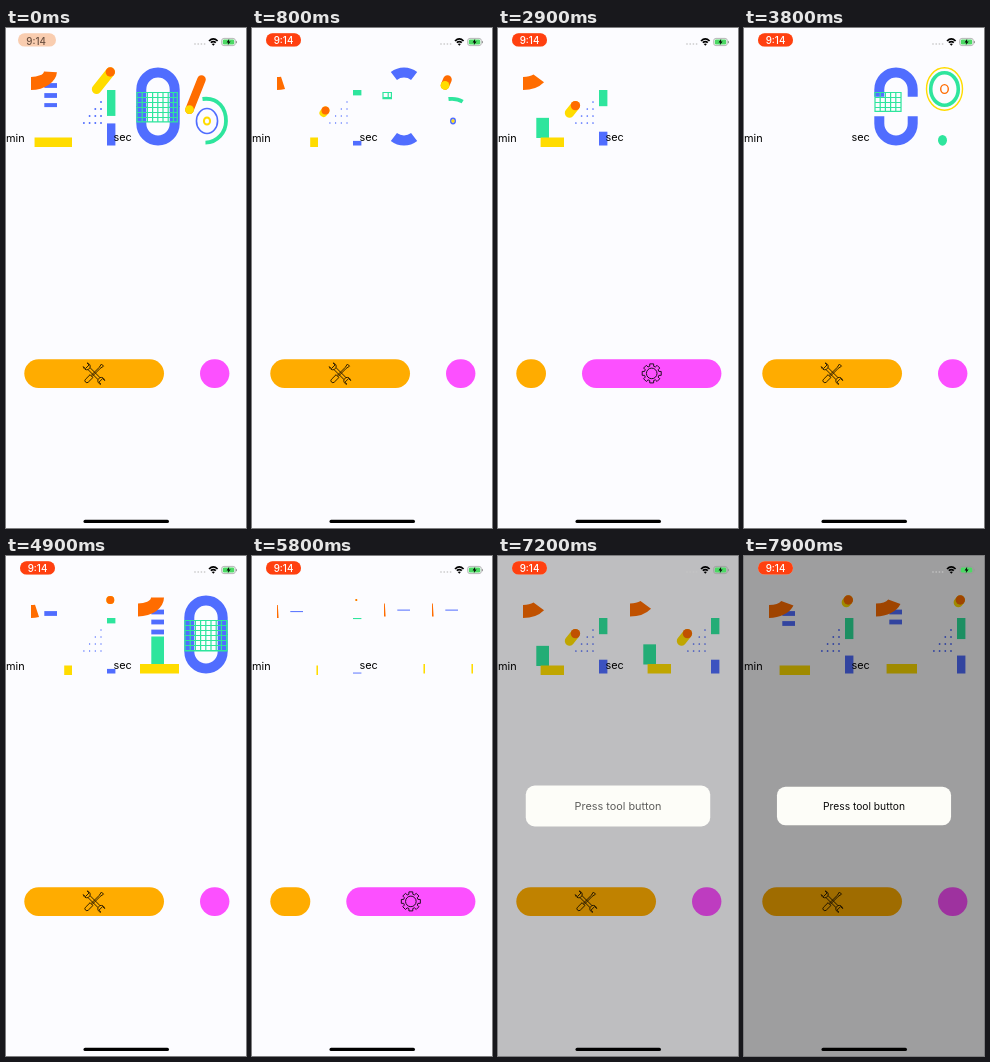
An HTML page for the animation above (8000 ms loop, 240 px wide and 500 px high).

```html
<!DOCTYPE html>
<html lang="en">
<head>
<meta charset="utf-8">
<style>
  html, body { margin: 0; width: 100%; height: 100%; overflow: hidden; background: #fcfcff; }
  svg { display: block; width: 240px; height: 500px; font-family: Inter, "Liberation Sans", sans-serif; }
</style>
</head>
<body>
<svg id="stage" viewBox="0 0 240 500"></svg>
<script>
const LOOP = 8000, STEP = 100, FADE = 500;
const BLUE = '#506dff', GREEN = '#2ee59d', YELLOW = '#ffdc00', ORANGE = '#ff6c00';
const stage = document.getElementById('stage');

const clamp = v => Math.max(0, Math.min(1, v));
const mix = (a, b, k) => a + (b - a) * k;
const ramp = (t, start, length) => {
  const k = clamp((t - start) / length);
  return k * k * (3 - 2 * k);
};

const rect = (x, y, w, h, fill, r = 0) =>
  w > 0 && h > 0 ? `<rect x="${x}" y="${y}" width="${w}" height="${h}" rx="${r}" fill="${fill}"/>` : '';
const oval = (x, y, rx, ry, fill) => `<ellipse cx="${x}" cy="${y}" rx="${rx}" ry="${ry}" fill="${fill}"/>`;
const ring = (x, y, rx, ry, color, width) =>
  `<ellipse cx="${x}" cy="${y}" rx="${rx}" ry="${ry}" fill="none" stroke="${color}" stroke-width="${width}"/>`;
const path = (d, color, width, extra = '') =>
  `<path d="${d}" fill="none" stroke="${color}" stroke-width="${width}" ${extra}/>`;
const trimmed = (d, color, width, k) =>
  k > 0 ? path(d, color, width, `pathLength="1" stroke-dasharray="${k} 2"`) : '';
const text = (x, y, size, fill, label, extra = '') =>
  `<text x="${x}" y="${y}" font-size="${size}" fill="${fill}" ${extra}>${label}</text>`;
const group = (transform, content, opacity = 1) =>
  `<g transform="${transform}" opacity="${opacity}">${content}</g>`;

// Each digit is drawn in a 43 px wide slot; p is presence, rise and fall count from its start and to its end.
const eightTop = p => group(`translate(21.5 61) scale(${clamp(p * 3)})`,
  ring(0, 0, 18, 21.3, YELLOW, 1.4) + ring(0, 0, 13.8, 16.3, GREEN, 3.6) + ring(0, 0, 3.8, 4.4, ORANGE, 1.4));

// A bent band between two quarter ellipses, opening from its lower end.
function flag(p) {
  const a = p * Math.PI / 2, sin = Math.sin(a), cos = Math.cos(a);
  return `<path fill="${ORANGE}" d="M1 47.5A13 6 0 0 0 ${1 + 13 * sin} ${41.5 + 6 * cos}`
    + `L${1 + 26 * sin} ${41.5 + 19 * cos}A26 19 0 0 1 1 60.5Z"/>`;
}

const digits = {
  0({ p }) {
    const w = 42 * p, h = 30.5 * p, reach = clamp(p * 1.24);
    let out = '';
    for (const side of [0, 1]) {
      const x = side ? 37.7 : 4.3;
      out += trimmed(`M21 44.5A16.7 17 0 0 ${side} ${x} 61.5V79`, BLUE, 10, reach);
      out += trimmed(`M21 112.5A16.7 17 0 0 ${1 - side} ${x} 95.5V78`, BLUE, 10, reach);
    }
    let lines = `M0 64.5h${w}v${h}h${-w}z`;
    for (let x = 5.2; x < w; x += 5.2) lines += `M${x} 64.5v${h}`;
    for (let y = 5; y < h; y += 5) lines += `M0 ${64.5 + y}h${w}`;
    return out + path(lines, GREEN, 1.2);
  },
  1({ p, rise, fall }) {
    const leaving = fall < 1;
    const shown = leaving ? 25 * clamp((p - 0.7) / 0.3) : 25 * p;
    const base = leaving ? 28 * clamp((p - 0.2) * 1.8) : 28 * clamp((rise - 1) / 0.3);
    let out = '';
    for (const y of [0, 10, 20]) {
      out += rect(14.3, 53.6 + y, 12.7, Math.min(4.8, shown - y), BLUE);
    }
    return out + rect(14.3, 108.5 - base, 12.7, base, GREEN)
      + rect(42 - 39 * p, 108, 39 * p, 9.5, YELLOW) + flag(p);
  },
  4({ p, rise, fall }) {
    const head = clamp((rise - 0.75) / 0.5);
    const from = fall < 1 ? 1 - Math.max(0.3 * p, 1 - (1 - p) * 3.1) : 0;
    const point = k => [mix(37.3, 4.5, k), mix(44, 85, k)];
    const r = 4.7 * clamp(p * 4 + 0.05), [x, y] = point(from), [endX, endY] = point(Math.max(head, from));
    let out = path(`M${x} ${y}L${endX} ${endY}`, YELLOW, 2 * r, 'stroke-linecap="round"')
      + oval(x, y, r, r, ORANGE);
    const dot = 0.6 + 0.4 * p;
    if (p > 0.1) for (let row = 0; row < 4; row++) {
      for (let col = 0; col <= row; col++) {
        out += oval(28 - col * 5.7, 74 + row * 7, dot, dot, BLUE);
      }
    }
    return out + rect(34, 62, 8.4, 27 * p, GREEN) + rect(34, 117.5 - 23 * p, 8.4, 23 * p, BLUE);
  },
  6({ p }) {
    const x = mix(16.5, 4, p), y = mix(51, 83, p);
    return path(`M16.5 51.5L${x} ${y}`, ORANGE, 8.6, 'stroke-linecap="round"')
      + oval(x, y, 4.4, 4.4, YELLOW)
      + trimmed('M17.5 71C34 69 41 81 41 93S31 116 17.5 114.5', GREEN, 3.8, p)
      + ring(22, 93, 11 * p, 13 * p, BLUE, 1.6) + ring(22, 93, 3.2 * p, 3.7 * p, YELLOW, 2);
  },
  8({ p }) {
    const reach = clamp(p * 2.4);
    return eightTop(p) + trimmed('M21.5 112.5A16.5 20 0 0 1 5 92.5', BLUE, 9.5, reach)
      + trimmed('M21.5 112.5A16.5 20 0 0 0 38 92.5', BLUE, 9.5, reach * 0.95);
  },
  9({ p }) {
    return eightTop(p) + oval(19.5, 112.3, 4.5 * clamp(p * 2), 5.4 * clamp(p * 2), GREEN);
  }
};

// Spans are [digit, start, end] in ms.
const minuteSpans = digit => [[-480, 900], [900, 1905], [1905, 3200], [3810, 4800], [4800, 5760], [5780, 7500], [7510, 9000]]
  .map(([start, end]) => [digit, start, end]);
const slots = [
  [24, 1.5, minuteSpans(1)],
  [67, 0, minuteSpans(4)],
  [131, 0, [[0, -480, 900], [0, 900, 1600], [0, 1950, 2850], [0, 3200, 4110], [1, 4250, 5760], [1, 5780, 7500], [1, 7510, 9000]]],
  [179, 0, [[6, -480, 900], [8, 900, 1905], [9, 1950, 2850], [9, 3200, 4110], [0, 4250, 5760], [1, 5780, 6500], [4, 6500, 7500], [4, 7510, 9000]]]
];

function clock(t) {
  return slots.map(([x, y, spans]) => {
    const span = spans.find(([, start, end]) => t >= start && t < end);
    if (!span) return '';
    const rise = (t - span[1]) / FADE, fall = (span[2] - t) / FADE;
    return group(`translate(${x} ${y})`, digits[span[0]]({ rise, fall, p: clamp(Math.min(rise, fall)) }));
  }).join('');
}

const gear = (() => {
  const points = [];
  for (let tooth = 0; tooth < 8; tooth++) {
    for (const [offset, r] of [[-0.27, 7.4], [-0.2, 9.7], [0.2, 9.7], [0.27, 7.4]]) {
      const a = tooth * Math.PI / 4 + offset;
      points.push(`${(r * Math.cos(a)).toFixed(2)} ${(r * Math.sin(a)).toFixed(2)}`);
    }
  }
  return path(`M${points.join('L')}Z`, '#201020', 1, 'stroke-linejoin="round"') + ring(0, 0, 5.3, 5.3, '#201020', 1);
})();

const tools = (() => {
  const ink = '#2a1c00';
  const wrench = path('M-7 -1.4H7M-7 1.4H7', ink, 0.9)
    + path('M-12.5 -2.6H-9.6V2.6H-12.5A4 4 0 0 0 -7 1.4V-1.4A4 4 0 0 0 -12.5 -2.6Z', ink, 0.9)
    + path('M12.5 -2.6H9.6V2.6H12.5A4 4 0 0 1 7 1.4V-1.4A4 4 0 0 1 12.5 -2.6Z', ink, 0.9);
  const driver = path('M-12 0a2 2 0 0 1 2 -2H-3.5V2H-10a2 2 0 0 1 -2 -2ZM-3.5 -.7H8L12 -1.5V1.5L8 .7H-3.5', ink, 0.9);
  return group('rotate(45)', wrench) + group('rotate(-45)', driver);
})();

function buttons(t) {
  const open = ramp(t, 1525, 450) - ramp(t, 3300, 450) + ramp(t, 5435, 450) - ramp(t, 6300, 450);
  const edge = mix(158, 48, open), right = edge + 36;
  return rect(18.3, 331.3, edge - 18.3, 28.6, '#ffac00', 14.3)
    + rect(right, 331.3, 223.4 - right, 28.6, '#fc50ff', 14.3)
    + group(`translate(${(18 + edge) / 2} 345.6)`, tools, clamp((edge - 110) / 48))
    + group(`translate(${(right + 223.4) / 2} 345.4)`, gear, clamp((158 - edge) / 38));
}

function alertBox(t) {
  if (t < 6900) return '';
  const k = 1 - Math.exp((6900 - t) / 300);
  const box = rect(-86.5, -19.2, 173, 38.4, '#fdfdf8', 8.5)
    + text(0, 3.6, 10.2, '#000', 'Press tool button', `text-anchor="middle" opacity="${k}"`);
  return `<rect width="240" height="500" opacity="${0.39 * k}"/>`
    + group(`translate(120 250) scale(${mix(1.18, 1, k)})`, box, clamp(k * 1.6));
}

function statusBar(t) {
  const k = clamp(t / 400), grow = 2 * (1 - k);
  const pill = rect(14 - grow, 5.3, 35 + grow * 1.5, 13.3, '#f9cdb0', 6.6)
    + `<rect x="14" y="5.3" width="35" height="13.3" rx="6.6" fill="#ff4010" opacity="${k}"/>`;
  let signal = '';
  for (let i = 0; i < 4; i++) signal += oval(189 + i * 3.2, 16, 0.9, 0.8, '#c4c4c4');
  const wifi = path('M203 13Q207.3 8.8 211.6 13M204.8 14.7Q207.3 12.4 209.8 14.7', '#000', 1.7)
    + '<path d="M207.3 17.8L205.7 16Q207.3 14.8 208.9 16Z"/>';
  const battery = '<rect x="215.7" y="10.4" width="13.6" height="7.2" rx="2.2" fill="none" stroke="#999" stroke-width=".7"/>'
    + rect(216.8, 11.4, 11.4, 5.2, '#4cd964', 1.3) + rect(230, 12.7, 1, 2.6, '#999', 0.5)
    + '<path d="M223.2 10.8L220.6 14.4H222.4L221.7 17.2L224.6 13.4H222.8Z"/>';
  return pill + text(31.5 - grow * 0.7, 15.6 + grow * 0.8, 9.8, k < 0.5 ? '#6b5040' : '#fff', '9:14', 'text-anchor="middle" font-weight="500"')
    + signal + wifi + battery;
}

function draw(t) {
  stage.innerHTML = rect(0, 0, 240, 500, '#fcfcff') + clock(t)
    + text(0, 114.2, 10.9, '#000', 'min') + text(107.4, 113.1, 10.9, '#000', 'sec')
    + buttons(t) + alertBox(t) + statusBar(t)
    + rect(77.5, 491.8, 85.5, 3.2, '#000', 1.6);
}

const begin = performance.now();
let shown = -1;
function tick() {
  const t = Math.floor((performance.now() - begin) % LOOP / STEP) * STEP;
  if (t !== shown) draw(shown = t);
  requestAnimationFrame(tick);
}
tick();
</script>
</body>
</html>
```
